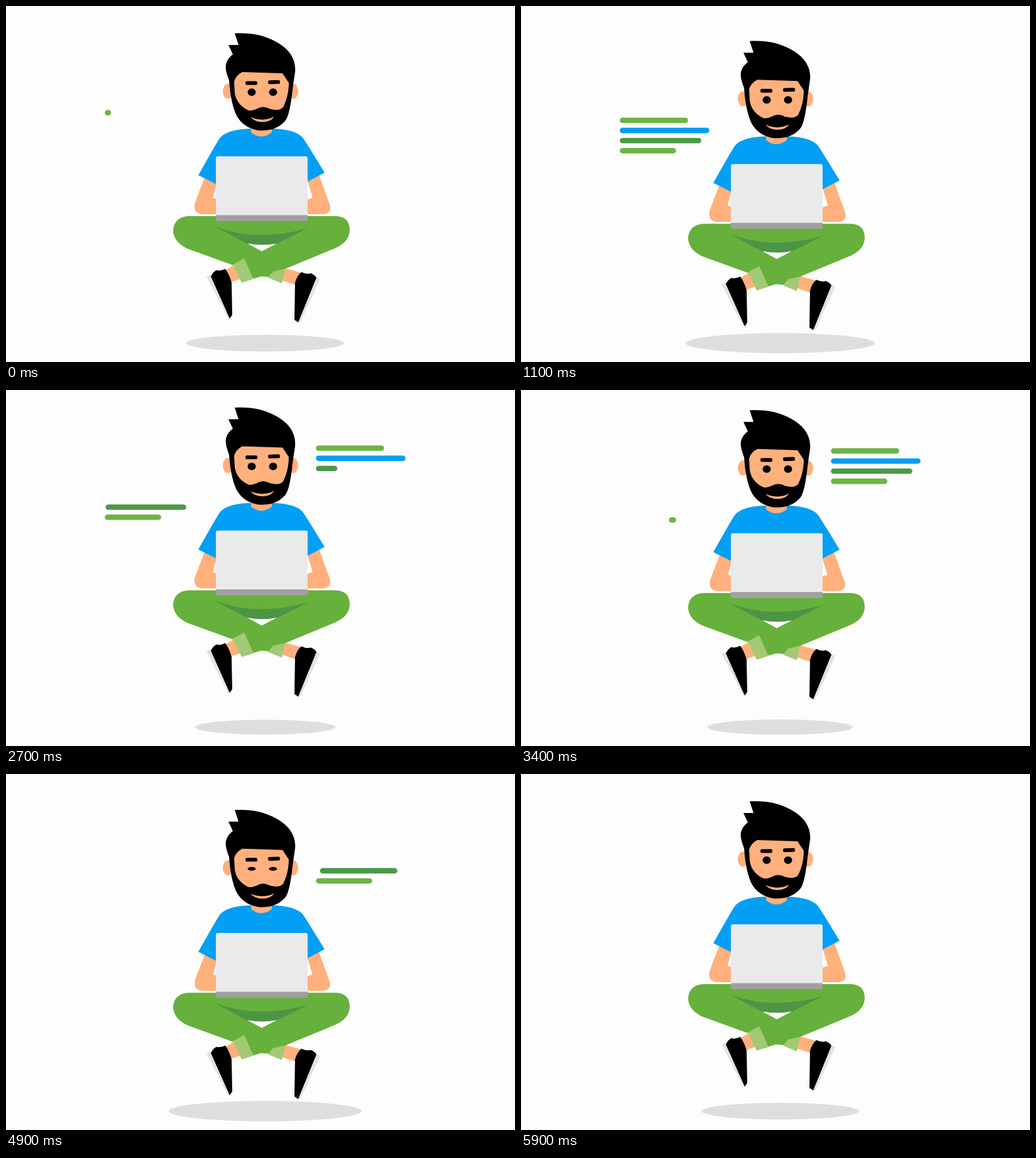
These frames come from a looping animation (810x566 px, 6000 ms). An HTML page:

```html
<!DOCTYPE html>
<html lang="en">
<head>
<meta charset="utf-8">
<title>Floating coder</title>
<style>
html, body { margin: 0; width: 100%; height: 100%; overflow: hidden; background: #fdfdfd; }
svg { display: block; width: 100vw; height: 100vh; filter: blur(0.5px); }
.skin { fill: #ffb07c; }
.shirt { fill: #039ff5; }
.pants { fill: #66b03c; }
.fold { fill: #4c9545; }
.cuff { fill: #a2c975; }
.sole { fill: #e2e2e2; }
#bars line { stroke-width: 8.6; stroke-linecap: round; }
</style>
</head>
<body>
<svg viewBox="0 0 810 566">
  <ellipse id="shadow" cx="412.5" cy="536" fill="#dedede"/>
  <g id="man">
    <g id="bars"></g>

    <path class="skin" d="M364 411L349 420L358 439L373 434ZM444 417L469 424L462 444L438 436Z"/>
    <path class="sole" d="M319 430L327 427L360 493L354 498ZM492 430L500 434L469 502L463 504Z"/>
    <path d="M326 430Q330 422 335 420Q340 422 349 418Q356 428 359 440L360 491L356 497ZM460 440Q463 429 470 423Q478 427 485 425Q491 427 494 432L465 503L459 499Z"/>

    <path class="pants" d="M290 334H525C541 335 547 343 547 357C546 372 535 380 524 385L444 418L420 431L406 430L392 434L376 419L361 412L292 387C279 382 266 372 266 356C267 343 275 335 290 334Z"/>
    <path class="fold" d="M331 350Q368 364 405 364Q443 364 481 353L431 378Q408 383 384 378Z"/>
    <path fill="#fdfdfd" d="M384 377.500Q408 382 431 377.500L407 390Z"/>
    <path class="cuff" d="M361 411L379 401L394 434L375 440ZM417 432L425 422L444 418L439 441Z"/>

    <path id="leftArm" class="skin" d="M316 273L301 312C297 325 304 331 314 331H336V307L329 305L336 280Z"/>
    <path id="rightArm" class="skin" d="M498 268L515 315C519 326 512 331 503 331H479V308L488 305L479 275Z"/>
    <path class="shirt" d="M389 195Q353 196 341 209Q337 214 306 269L334 283V300H480V279L507 265Q476 214 472 209Q460 196 424 195Z"/>
    <path class="skin" d="M390 190V201Q406 214 423 201V190Z"/>

    <ellipse class="skin" cx="353" cy="135.500" rx="8" ry="12"/>
    <ellipse class="skin" cx="457" cy="135.500" rx="8" ry="12"/>
    <path d="M364 43.500C388 42 411 46 430 57C450 68 462 84 460 105C458 118 456 132 455 142C452 164 449 177 444 183C433 195 420 198 406 198C386 197 371 185 365 170C358 152 356 132 355 118C350 105 349 98 350 93C352 85 356 81 361 77L354 62H370Z"/>
    <path class="skin" d="M376 105L440 107L450 122C450 138 446 151 441 161C435 167 428 165 421 164Q409 157 398 164Q391 167 386 166C372 160 365 148 364 138L363 120Q366 110 376 105Z"/>
    <path class="skin" d="M389 176.500Q408 185 427 176Q421 184.500 408 184.500Q396 184.500 389 176.500Z"/>
    <rect x="381" y="119.500" width="19" height="6" rx="2.500"/>
    <rect x="417" y="118" width="19" height="6" rx="2.500" transform="rotate(-2 426 121)"/>
    <ellipse class="eye" cx="391" cy="137" rx="6.500" ry="6"/>
    <ellipse class="eye" cx="425" cy="137" rx="6.500" ry="6"/>

    <rect x="334" y="239" width="146" height="98" rx="3" fill="#eaeaea"/>
    <rect x="334" y="332.500" width="146" height="9.500" rx="1" fill="#a0a0a0"/>
  </g>
</svg>
<script>
const LOOP = 6000, GROW = 250, SHRINK = 356;
const $ = id => document.getElementById(id);
const clamp = v => Math.max(0, Math.min(1, v));
const eyes = document.querySelectorAll('.eye');
const rows = [[99, '#6db444'], [133, '#039ff5'], [120, '#4a9a47'], [80, '#6db444']];
const blocks = [
  { x: 161.5, y: 169.5, show: 0, hide: 1985 },
  { x: 497.5, y: 108, show: 2150, hide: 4170 }
];
const bars = blocks.flatMap(block => rows.map(([length, color], i) => {
  const line = document.createElementNS('http://www.w3.org/2000/svg', 'line');
  const y = block.y + i * 16.1;
  line.setAttribute('stroke', color);
  line.setAttribute('y1', y);
  line.setAttribute('y2', y);
  $('bars').append(line);
  return { line, length, x: block.x, show: block.show + i * GROW, hide: block.hide + i * SHRINK };
}));

function drawBar({ line, length, x, show, hide }, t) {
  const visible = t >= show && t < hide + SHRINK;
  line.setAttribute('visibility', visible ? 'visible' : 'hidden');
  line.setAttribute('x1', x + length * clamp((t - hide) / SHRINK));
  line.setAttribute('x2', x + length * clamp((t - show) / GROW) + 1);
}

function draw(t) {
  // Time away from the lowest pose; the bob mirrors around its highest point.
  const away = Math.abs(1965 - Math.abs(t - 2950));
  const near = Math.min(away, 1000), far = Math.max(away - 1000, 0);
  const top = 56.9 - near * 0.014 - far * 0.0215;
  const width = 308 - near * 0.058 - far * 0.037;
  $('man').setAttribute('transform', `translate(0 ${top - 43})`);
  $('shadow').setAttribute('rx', width / 2);
  $('shadow').setAttribute('ry', width * 0.053);

  const typing = 0.5 * Math.sin(t * Math.PI / 150);
  $('leftArm').setAttribute('transform', `translate(${typing} 0)`);
  $('rightArm').setAttribute('transform', `translate(${-typing} 0)`);

  const open = clamp(Math.abs(t - 4950) / 100);
  eyes.forEach(eye => eye.setAttribute('ry', 6 * Math.max(open, 0.1)));
  bars.forEach(bar => drawBar(bar, t));
}

const start = performance.now();
function tick() {
  draw((performance.now() - start) % LOOP);
  requestAnimationFrame(tick);
}
tick();
</script>
</body>
</html>
```
